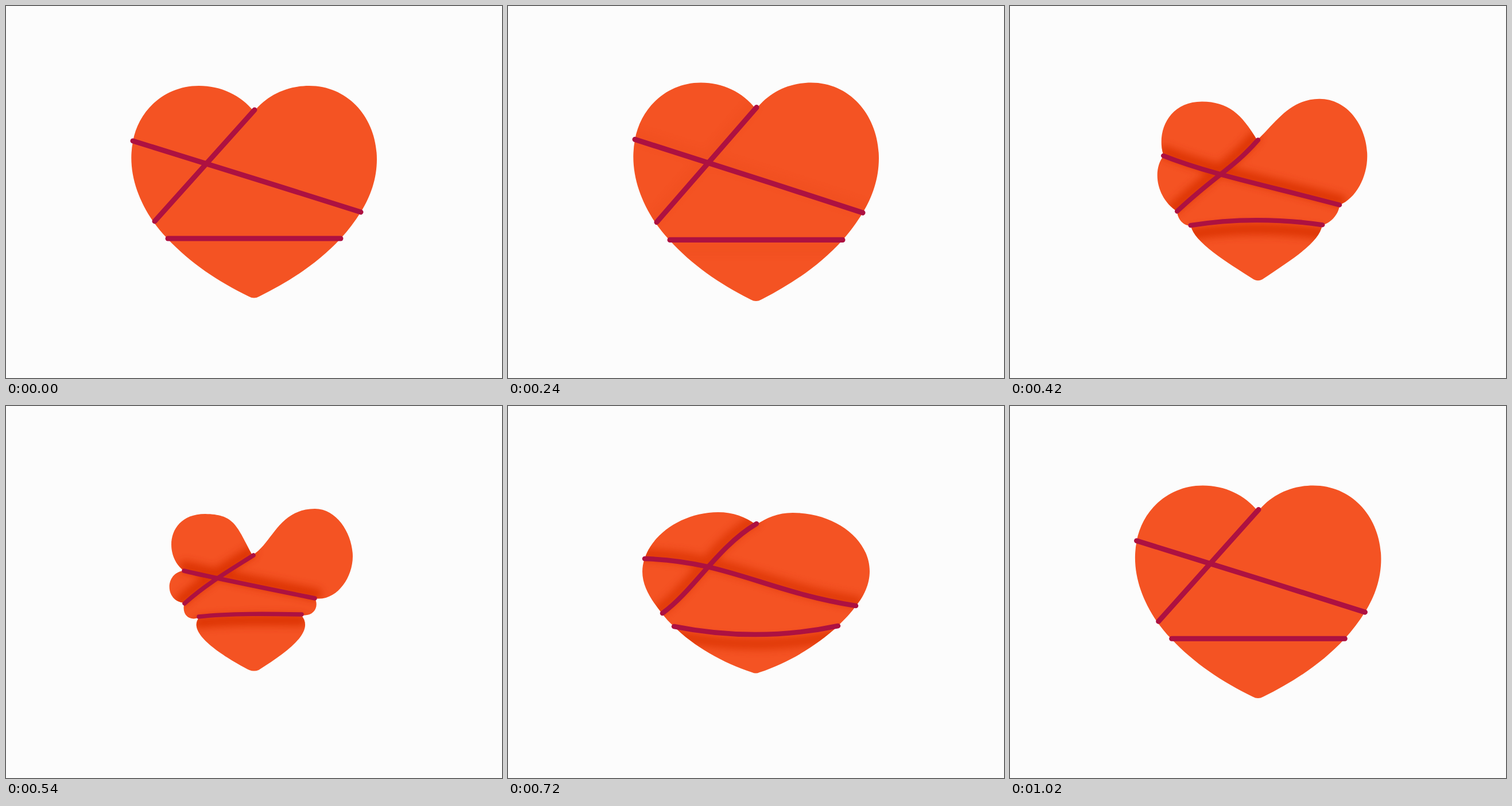
Recreate the animation shown at these times as an HTML page. Size 864x648 px, loop 1.08 s.

```html
<!DOCTYPE html>
<html lang="en">
<head>
<meta charset="utf-8">
<title>Bound heart</title>
<style>
  html, body { margin: 0; height: 100%; overflow: hidden; background: #fcfcfc; }
  svg { display: block; width: 100vw; height: 100vh; }
  .cord, .shade { fill: none; stroke-linecap: round; }
  .cord { stroke: #ad1141; }
  .shade { stroke: #da3000; stroke-width: 20; }
</style>
</head>
<body>
<svg viewBox="0 0 864 648">
  <defs>
    <clipPath id="clip"><path class="heart"/></clipPath>
    <filter id="blur" filterUnits="userSpaceOnUse" x="0" y="0" width="864" height="648">
      <feGaussianBlur stdDeviation="7"/>
    </filter>
  </defs>
  <g id="all">
    <path class="heart" fill="#f45323"/>
    <g clip-path="url(#clip)">
      <g id="shades" filter="url(#blur)">
        <path class="shade"/><path class="shade"/><path class="shade"/>
      </g>
    </g>
    <path class="cord"/><path class="cord"/><path class="cord"/>
  </g>
</svg>
<script>
const STEP = 60, LOOP = 1080;

// Each pose: outline, three cords, cord width, drop of the lowest shadow.
const rest = {
  heart: 'M432 184C455 155 490 139 528 139C597 139 646 196 646 267C646 301 635 332 618 359' +
    'C608 375 596 391 583 405C543 448 494 480 441 506Q432 511 423 506C370 480 321 448 281 405' +
    'C272 396 264 386 256 375C226 331 212 283 221 236C231 181 277 139 336 139C374 139 409 155 432 184Z',
  cords: ['M221 235C353 276 486 317 618 359', 'M433 181C375 246 317 311 259 375', 'M282 405C382 405 483 405 583 405'],
  width: 9, drop: 14
};
const pinch = {
  heart: 'M432 210C462 170 500 146 540 146C600 146 639 199 639 261C639 296 628 330 607 357' +
    'C598 370 585 385 571 398C540 427 500 449 439 491Q432 496 425 491C375 454 328 426 295 396' +
    'C288 389 280 381 273 371C240 333 219 286 229 237C235 183 273 147 323 147C364 147 405 170 432 210Z',
  cords: ['M228 237C354 291 432 306 607 357', 'M433 209C384 282 360 286 273 370', 'M295 396C387 378 480 378 571 398'],
  width: 9, drop: 20
};
const tight = {
  heart: 'M429 260C465 238 474 180 538 179C578 179 604 225 604 262C604 300 575 341 538 335' +
    'C546 350 536 368 514 364C539 392 494 426 440 460Q432 463 424 460C380 437 312 395 337 368' +
    'C319 376 305 363 311 343C276 341 276 290 310 287C275 263 278 188 347 188C397 189 401 206 429 260Z',
  cords: ['M310 287C345 296 460 319 538 335', 'M431 260C395 283 350 309 311 344', 'M336 367C390 361 460 362 515 363'],
  width: 7.5, drop: 10
};
const squash = {
  heart: 'M432 207C450 195 470 186 496 186C570 186 630 232 630 288C630 310 620 332 606 348' +
    'C598 360 586 372 575 383C538 417 490 447 438 464Q432 467 425 464C375 448 323 418 289 384' +
    'C281 377 274 369 268 361C243 330 226 300 238 266C252 221 307 185 366 185C392 185 414 193 432 207Z',
  cords: ['M238 266C380 270 450 323 606 348', 'M433 205C365 245 325 320 269 361', 'M289 384C385 403 480 403 575 383'],
  width: 8.5, drop: 16
};

const linear = k => k;
const smooth = k => k * k * (3 - 2 * k);
const easeIn = k => k ** 1.75;
const easeOut = k => 1 - (1 - k) ** 1.6;

// time, pose, x scale, y scale, shadow strength, easing towards this key
const keys = [
  [0, rest, 1, 1, 0, linear],
  [180, rest, 1, 1.049, 0, smooth],
  [240, rest, 1, 1.03, 0.08, linear],
  [360, pinch, 1, 1, 0.85, easeIn],
  [540, tight, 1, 1, 0.9, easeOut],
  [720, squash, 1, 1, 0.75, smooth],
  [840, rest, 1, 1.012, 0.03, linear],
  [900, rest, 1.008, 1.02, 0, linear],
  [1020, rest, 1.002, 1.003, 0, linear],
  [LOOP, rest, 1, 1, 0, linear]
];

const mix = (a, b, k) => a + (b - a) * k;
const number = /[\d.]+/g;
function mixPath(a, b, k) {
  const ends = b.match(number);
  let i = 0;
  return a.replace(number, v => mix(+v, +ends[i++], k).toFixed(2));
}

const all = document.getElementById('all');
const shadeGroup = document.getElementById('shades');
const hearts = document.querySelectorAll('.heart');
const cords = document.querySelectorAll('.cord');
const shades = document.querySelectorAll('.shade');

function draw(time) {
  const i = keys.findIndex(key => key[0] > time);
  const [t0, p, x0, y0, s0] = keys[i - 1];
  const [t1, q, x1, y1, s1, ease] = keys[i];
  const k = ease((time - t0) / (t1 - t0));

  const outline = mixPath(p.heart, q.heart, k);
  hearts.forEach(h => h.setAttribute('d', outline));

  const shifts = [[2, -7], [-6, -5], [0, mix(p.drop, q.drop, k)]];
  cords.forEach((cord, n) => {
    const d = mixPath(p.cords[n], q.cords[n], k);
    cord.setAttribute('d', d);
    cord.setAttribute('stroke-width', mix(p.width, q.width, k));
    shades[n].setAttribute('d', d);
    shades[n].setAttribute('transform', `translate(${shifts[n]})`);
  });

  shadeGroup.setAttribute('opacity', mix(s0, s1, k));
  all.setAttribute('transform',
    `translate(432 324) scale(${mix(x0, x1, k)} ${mix(y0, y1, k)}) translate(-432 -324)`);
}

function tick() {
  draw(Math.floor(performance.now() % LOOP / STEP) * STEP);
  requestAnimationFrame(tick);
}
tick();
</script>
</body>
</html>
```
